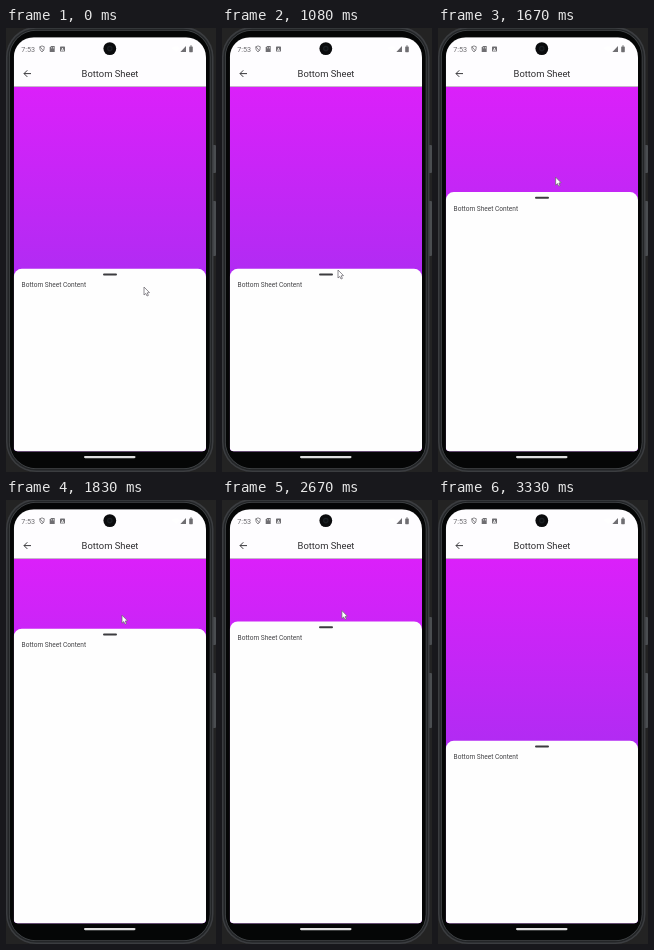
These frames come from a looping animation (210x444 px, 3500 ms). An HTML page with a canvas:

```html
<!DOCTYPE html>
<html lang="en">
<head>
<meta charset="utf-8">
<title>Bottom Sheet</title>
<style>
  html, body { margin: 0; width: 100%; height: 100%; overflow: hidden; background: #232323; }
  canvas { display: block; width: 210px; height: 444px; }
</style>
</head>
<body>
<canvas id="stage"></canvas>
<script>
const W = 210, H = 444, LOOP = 3500, FPS = 12;
const canvas = document.getElementById('stage');
const ctx = canvas.getContext('2d');
const dpr = window.devicePixelRatio || 1;
canvas.width = W * dpr;
canvas.height = H * dpr;
ctx.scale(dpr, dpr);

const screen = { x: 7.8, y: 9.2, w: 192.2, h: 414 };
const headerEnd = 58.7;
const release = 33, pointerEnd = 36;

// Progress of step k from a to b, 0 to 1.
const part = (k, a, b) => Math.min(1, Math.max(0, (k - a) / (b - a)));
const ease = (k, a, b) => (1 - Math.cos(Math.PI * part(k, a, b))) / 2;

// Dragged up, pulled back a little, then dropped to rest.
function sheetTop(k) {
  return 240.8 - 138 * ease(k, 14, 25.2) + 20 * ease(k, 27, release)
    + 118 * ease(k, release, 38.5);
}

function pointerAt(k) {
  const approach = ease(k, 0, 7);
  const leave = part(k, release, pointerEnd);
  const wobble = 2 - 2 * Math.cos(2 * Math.PI * part(k, 13, 26) * 13 / 9);
  return {
    x: 138 - 22 * approach + wobble + 33 * leave,
    y: 259 - 17 * approach - 151 * ease(k, 13, 25.2)
      + 21 * ease(k, 27, release) + 213 * leave
  };
}

function box(x, y, w, h, r, fill) {
  ctx.beginPath();
  ctx.roundRect(x, y, w, h, r);
  ctx.fillStyle = fill;
  ctx.fill();
}

function disc(x, y, r, fill) {
  ctx.beginPath();
  ctx.arc(x, y, r, 0, Math.PI * 2);
  ctx.fillStyle = fill;
  ctx.fill();
}

function shape(points, fill) {
  ctx.beginPath();
  points.forEach(([x, y]) => ctx.lineTo(x, y));
  ctx.closePath();
  ctx.fillStyle = fill;
  ctx.fill();
}

function label(str, x, y, size, color, align = 'left', weight = 400) {
  ctx.font = `${weight} ${size}px Roboto, sans-serif`;
  ctx.textAlign = align;
  ctx.fillStyle = color;
  ctx.fillText(str, x, y);
}

function drawPhone() {
  ctx.fillStyle = '#232323';
  ctx.fillRect(0, 0, W, H);
  box(206, 117, 4, 28, 1, '#4a4d50');
  box(206, 173, 4, 55, 1, '#4a4d50');
  box(0, -1, 207.5, 445, 30, '#3b3d40');
  box(1.5, 0.7, 204.5, 441.8, 28.5, '#232527');
  box(3, 2, 201.5, 439, 27, '#45484b');
  box(3.8, 2.8, 199.9, 437.4, 26, '#050606');
  box(78, 428, 51.5, 2.2, 1.1, '#dedede');
}

function drawStatus() {
  const gray = '#6f6e72';
  label('7:53', 15.3, 23.6, 7.2, gray);

  ctx.strokeStyle = gray;
  ctx.lineWidth = 0.8;
  ctx.beginPath();
  ctx.moveTo(36, 17.9);
  ctx.lineTo(38.3, 18.8);
  ctx.quadraticCurveTo(38.5, 22.5, 36, 24);
  ctx.quadraticCurveTo(33.5, 22.5, 33.7, 18.8);
  ctx.closePath();
  ctx.moveTo(34, 18.8);
  ctx.lineTo(37.6, 23);
  ctx.stroke();

  shape([[45.2, 18], [48.7, 18], [48.7, 24], [43.7, 24], [43.7, 19.6]], gray);
  box(45.5, 19, 0.6, 1.4, 0, '#fff');
  box(47, 19, 0.6, 1.4, 0, '#fff');

  box(54, 18.4, 5, 5.2, 0.7, gray);
  label('A', 56.5, 22.7, 4.4, '#fff', 'center', 700);

  ctx.beginPath();
  ctx.moveTo(169.8, 24);
  ctx.arc(169.8, 24, 5.5, -Math.PI * 0.76, -Math.PI * 0.24);
  ctx.closePath();
  ctx.fill();
  shape([[180, 18], [180, 24], [174.4, 24]], gray);
  box(183.2, 18.4, 3.6, 5.8, 0.6, gray);
  box(184.2, 17.6, 1.6, 1, 0, gray);
}

function drawHeader() {
  ctx.fillStyle = '#fefdff';
  ctx.fillRect(screen.x, screen.y, screen.w, headerEnd - screen.y);
  drawStatus();
  disc(103.8, 20.6, 6.4, '#0a0b0d');
  disc(103.8, 20.6, 2.8, '#1a1e22');
  disc(103.8, 20.6, 1.5, '#0e1114');

  ctx.strokeStyle = '#3a3a3d';
  ctx.lineWidth = 1;
  ctx.beginPath();
  ctx.moveTo(25, 45.6);
  ctx.lineTo(18, 45.6);
  ctx.moveTo(21.3, 42.3);
  ctx.lineTo(18, 45.6);
  ctx.lineTo(21.3, 48.9);
  ctx.stroke();
  label('Bottom Sheet', 104, 49.2, 9.4, '#2f2e31', 'center');
}

function drawSheet(y) {
  box(screen.x, y, screen.w, H - y, [8, 8, 0, 0], '#fefefe');
  box(97, y + 4.8, 14, 2, 1, '#3c3c3f');
  label('Bottom Sheet Content', 15.6, y + 18.5, 6.57, '#434346');
}

function drawPointer({ x, y }) {
  ctx.save();
  ctx.translate(x, y);
  shape([[0, 0], [0, 8], [1.8, 6.4], [3, 9], [4.4, 8.4], [3.2, 5.8], [5.5, 5.6]], '#fff');
  ctx.strokeStyle = '#6a676e';
  ctx.lineWidth = 0.75;
  ctx.lineJoin = 'round';
  ctx.stroke();
  ctx.restore();
}

const purple = ctx.createLinearGradient(0, headerEnd, 0, 241);
purple.addColorStop(0, '#db20fa');
purple.addColorStop(1, '#b22bf3');

function draw(k) {
  drawPhone();
  ctx.save();
  ctx.beginPath();
  ctx.roundRect(screen.x, screen.y, screen.w, screen.h, [20, 20, 4, 4]);
  ctx.clip();
  ctx.fillStyle = purple;
  ctx.fillRect(screen.x, headerEnd, screen.w, H - headerEnd);
  drawHeader();
  drawSheet(sheetTop(k));
  if (k <= pointerEnd) drawPointer(pointerAt(k));
  ctx.restore();
}

let start = null;
function tick(now) {
  if (start === null) start = now;
  const t = (now - start) % LOOP;
  // Motion is held at 12 steps a second.
  draw(Math.floor((t + 4) * FPS / 1000));
  requestAnimationFrame(tick);
}
requestAnimationFrame(tick);
</script>
</body>
</html>
```
